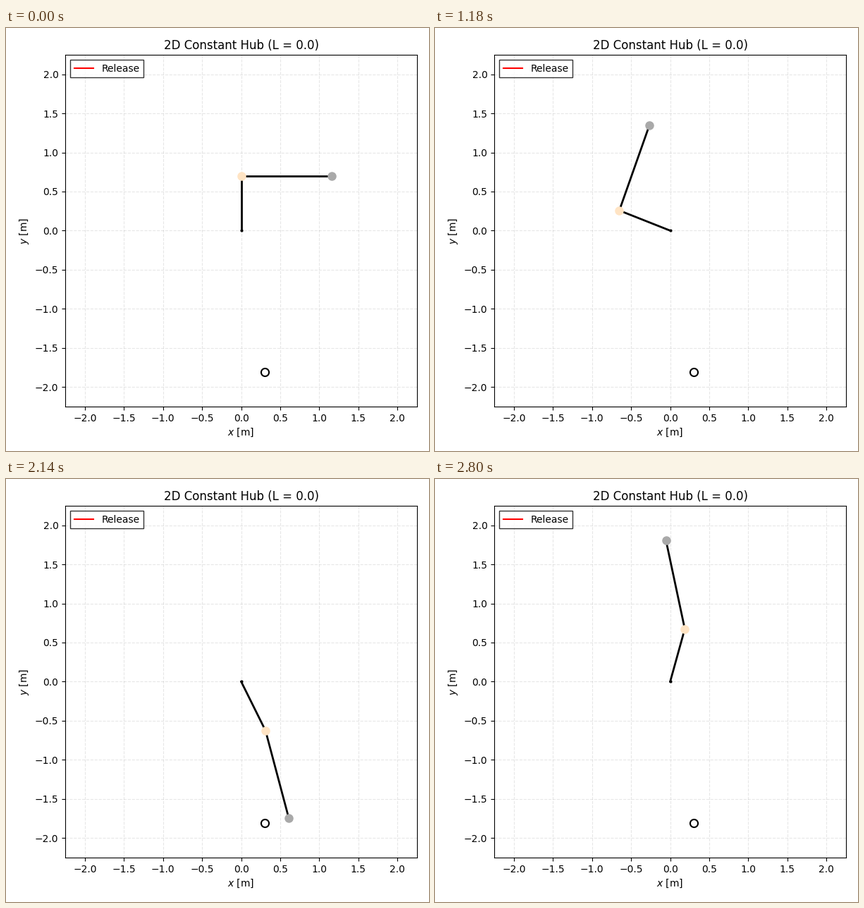
These frames come from a looping animation (600 by 600 pixels, 2.82 s). A matplotlib script:

```python
import numpy as np
import matplotlib.pyplot as plt
from matplotlib.animation import FuncAnimation

SIZE, DPI = 600, 100
FRAMES, STEP = 141, 20      # 2820 ms loop
ARM, CLUB = 0.7, 1.157      # link lengths [m]
ACCEL = 98.2                # arm acceleration while the wrist is locked [deg/s^2]
RELEASE = 0.8               # moment the wrist starts to open [s]

# Poses after release: time [s], arm lag behind steady acceleration, wrist opening [deg]
POSES = np.array([
    (1.18, -0.1, 1.9),
    (1.56, -2.1, 17.9),
    (1.92, -10.35, 51.5),
    (2.16, -19.4, 81.0),
    (2.36, -27.5, 104.1),
    (2.70, -39.0, 121.9),
    (2.80, -40.4, 117.5),
])


def fit(values):
    """Cubic q so that s^3 * q(s) follows the values after release."""
    s = POSES[:, 0] - RELEASE
    return np.polyfit(s, values / s**3, 3, w=s**3)


lag_fit, open_fit = fit(POSES[:, 1]), fit(POSES[:, 2])


def pose(t):
    """Wrist and club head positions at time t."""
    s = max(t - RELEASE, 0)
    turn = ACCEL * t**2 / 2 + s**3 * np.polyval(lag_fit, s)
    opening = s**3 * np.polyval(open_fit, s)
    arm, club = np.radians([turn + 90, turn + opening])
    wrist = ARM * np.array([np.cos(arm), np.sin(arm)])
    head = wrist + CLUB * np.array([np.cos(club), np.sin(club)])
    return wrist, head


fig = plt.figure(figsize=(SIZE / DPI, SIZE / DPI), dpi=DPI)
side = 498.8 / SIZE
ax = fig.add_axes([84.2 / SIZE, 63.2 / SIZE, side, side])
ax.set(xlim=(-2.25, 2.25), ylim=(-2.25, 2.25),
       xlabel="$x$ [m]", ylabel="$y$ [m]",
       title="2D Constant Hub (L = 0.0)")
ax.grid(linestyle="--", alpha=0.3)

ax.plot([], [], "r-", label="Release")
ax.plot(0.3, -1.81, "o", ms=8, mfc="white", mec="black", mew=1.5)
rods, = ax.plot([], [], "k-", lw=2)
ax.plot(0, 0, "ko", ms=2)
wrist_dot, = ax.plot([], [], "o", ms=8, color="bisque")
head_dot, = ax.plot([], [], "o", ms=8, color="darkgray")
ax.legend(loc="upper left", fancybox=False, edgecolor="black")


def update(i):
    wrist, head = pose(i * STEP / 1000)
    rods.set_data([0, wrist[0], head[0]], [0, wrist[1], head[1]])
    wrist_dot.set_data([wrist[0]], [wrist[1]])
    head_dot.set_data([head[0]], [head[1]])
    return rods, wrist_dot, head_dot


anim = FuncAnimation(fig, update, frames=FRAMES, interval=STEP,
                     repeat=True, repeat_delay=0)
plt.show()
```
